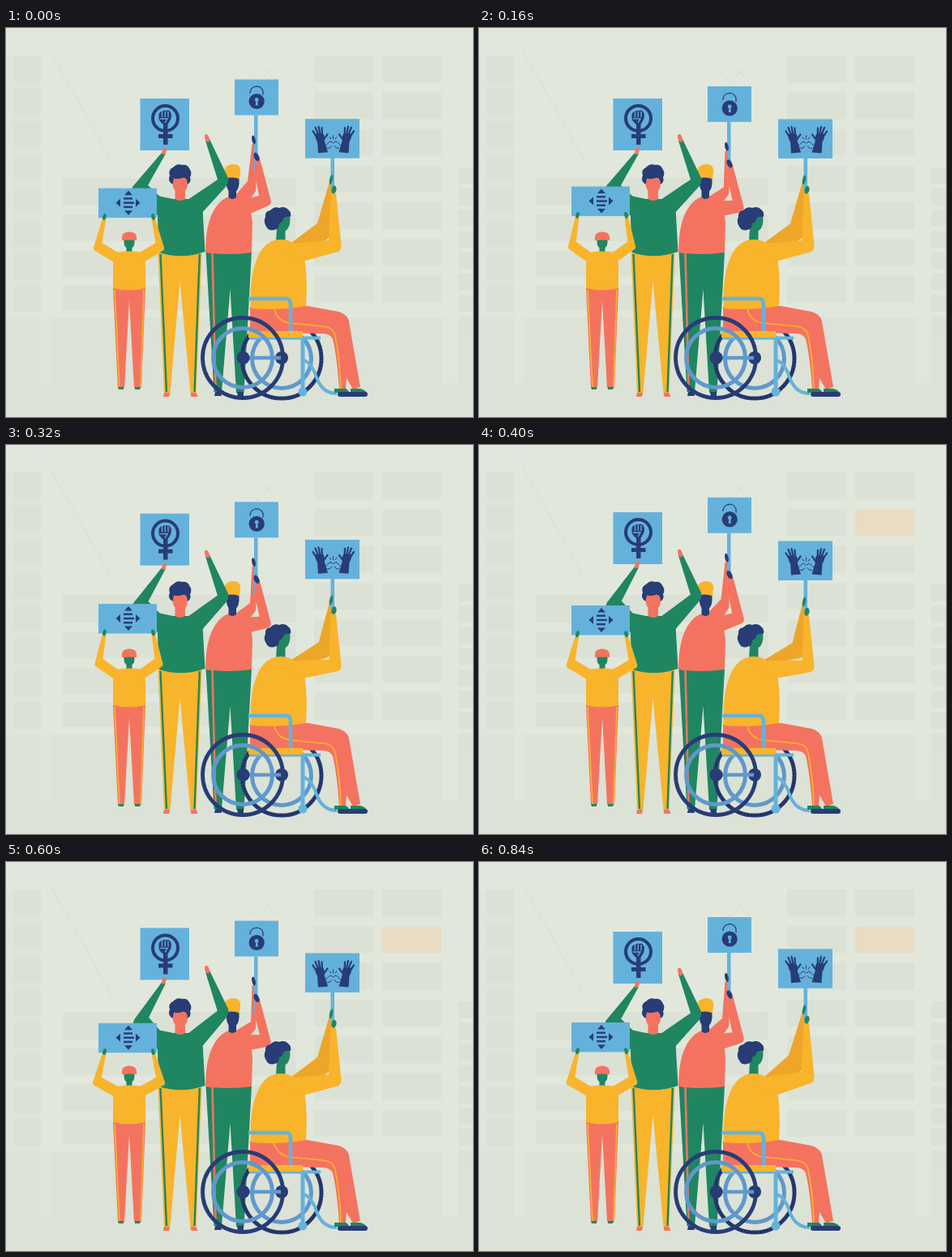
Animation, 576 px wide and 480 px high, one loop 0.88 s. Source, as an HTML page:

```html
<!DOCTYPE html>
<html>
<head>
<meta charset="utf-8">
<title>Raised signs</title>
<style>
html, body { margin: 0; width: 100%; height: 100%; overflow: hidden; background: #e1e7db; }
svg { display: block; width: 576px; height: 480px; }
</style>
</head>
<body>
<svg id="stage" viewBox="0 0 576 480" xmlns="http://www.w3.org/2000/svg"></svg>
<script>
const Y = '#f8b42b', DY = '#eda628', R = '#f47360', G = '#1f8661', N = '#283c75';
const B = '#64b2dc', MB = '#5f98cc', WIN = '#dbe1d5';
const LOOP = 880, STEP = 40;

const p = (d, fill, extra = '') => `<path d="${d}" fill="${fill}" ${extra}/>`;
const line = (d, color, w, extra = '') =>
  `<path d="${d}" fill="none" stroke="${color}" stroke-width="${w}" ${extra}/>`;
const box = (x, y, w, h, fill, extra = '') =>
  `<rect x="${x}" y="${y}" width="${w}" height="${h}" fill="${fill}" ${extra}/>`;
const dot = (x, y, r, fill, extra = '') => `<circle cx="${x}" cy="${y}" r="${r}" fill="${fill}" ${extra}/>`;
const ring = (x, y, r, color, w, extra = '') =>
  dot(x, y, r, 'none', `stroke="${color}" stroke-width="${w}" ${extra}`);
const group = (id, body) => `<g id="${id}">${body}</g>`;
const live = (id, fill) => `<path id="${id}" fill="${fill}"/>`;
const oval = (x, y, rx, ry, fill, turn = 0) =>
  `<ellipse cx="${x}" cy="${y}" rx="${rx}" ry="${ry}" fill="${fill}" transform="rotate(${turn} ${x} ${y})"/>`;

function column(x, w, y, pitch, h, n) {
  let s = '';
  for (let i = 0; i < n; i++) s += box(x, y + i * pitch, w, h, WIN);
  return s;
}

function backdrop() {
  return box(0, 0, 576, 480, '#e1e7db') +
    box(0, 357, 576, 123, '#dce2d6') +
    box(0, 34, 43, 323, '#dee4d8', 'opacity=".5"') +
    box(43, 357, 13, 81, '#e0e6da') + box(538, 357, 20, 81, '#e0e6da') +
    column(9, 34, 34.5, 40.4, 33, 8) +
    column(380, 73, 34, 45.3, 33, 7) +
    column(464, 73, 34, 45.3, 33, 7) +
    column(558, 18, 172, 26.2, 21, 8) +
    box(70, 185, 287, 34, WIN) + box(70, 230, 287, 33, WIN) +
    box(70, 275, 287, 32, WIN) + box(70, 318, 287, 30, WIN) +
    line('M53 27L97 104L131 167M545 27L576 59M294 52L318 76M311 43L333 66M333 45L308 69', '#d6ddd1', 1) +
    box(464, 80, 73, 31.5, '#e9dcc2', 'id="lamp"');
}

function child() {
  return p('M132 321H172L167 444H158L152 336L146 444H138Z', R) +
    line('M134 323L140 443M170 323L166 443', Y, 1.6) +
    p('M138 443h7v3h-6zM159 443h7l-1 3h-6z', G) +
    p('M148.500 266h7v11h-7z', G) +
    p('M137 277Q152 274 167 277L172 290V321Q152 326 132 321V290Z', Y) +
    live('childArm', Y) + '<use href="#childArm" transform="matrix(-1 0 0 1 303 0)"/>' +
    p('M145.500 259h13v5q0 8-6.500 8t-6.500-8z', G) +
    p('M143 262Q142 254 147 252.500Q152 250.500 157 252.500Q162 254 161 262Q152 261 143 262Z', R);
}

function woman() {
  return p('M187.500 278H241.500L234.500 450H227.500L214.500 312L202.500 450H195Z', Y) +
    line('M190.500 279L198 449M238.800 279L232.500 449', G, 2.4) +
    p('M195 450h7l-1 5h-7zM227.500 450h7l2 5h-8z', R) +
    live('armL', G) + live('armR', G) +
    p('M187 207L206 211H225L242 214L245.500 276Q217 286 188.500 277L187 235Z', G) +
    p('M208.500 197h12.500v14q-6 4-12.500 0z', R) +
    p('M205.500 184h18.500v8q0 11-9 11t-9.500-11z', R) +
    p('M203 191Q199.500 187 202 182Q199.500 175 206 172Q211 166.500 217 169Q224 168 226.500 174Q230 179 227 184Q229 190 224 193Q224 185 219 184.500Q213 187 207 185.500L205.500 193Z', N) +
    group('fistL', oval(195, 152, 2.4, 4.5, R, 20)) +
    group('fistR', oval(248, 136, 2.6, 5, R, -18));
}

function keyHolder() {
  return p('M246.500 276H303L293.500 450H284L276.500 322L266 449H256.500Z', G) +
    line('M254.500 278L258.500 445', R, 2.6) +
    p('M258 449h7l1 5h-9zM285 449h8v6h-7z', N) +
    live('keyFar', R) +
    p('M272 209Q286 206 300 212L304 240L303 277Q275 281 246 277Q246 223 272 209Z', R) +
    p('M274.500 198h9.500v11q-5 4-9.500 0z', N) +
    p('M272 183h15.500v9q-1 11-7.500 11q-7 0-8-9z', N) +
    p('M270 184Q267.500 177 271 171.500Q277 166.500 284 168.500Q290 170.500 289 178L288 186.500Q280 183 271 186Z', Y);
}

function rider() {
  return p('M301 344L372 343L410 350Q423 354 423.500 365L437 443L428 446L420 432L419 445H411Q408 404 403 384Q400 377 390 377L301 375Z', R) +
    line('M330 344Q334 362 350 364L390 368Q404 369 406 380Q412 410 413 445', Y, 1.6) +
    p('M334 247h10.500v16q-6 6-11.500 0z', G) +
    p('M331 262Q338 260 347 262Q365 268 369 289Q372 315 370 343Q340 349 302 346Q300 310 308 289Q315 267 331 262Z', Y) +
    live('riderNear', Y) +
    p('M336 228H349.500Q352 240 348 247Q343 254 334 250Z', G) +
    p('M321 245Q317 239 320 233Q319 226 326 225Q331 219.500 337 222Q344 219.500 348 224Q353 228 350.500 233Q345 232 342 235Q342 239 337 241Q337 248 331 249Q324 251 321 245Z', N);
}

function chairBack() {
  return ring(340, 408, 49, N, 5) + ring(340, 408, 49, '#1b2a50', 2, 'stroke-dasharray="2 2"') +
    ring(340, 408, 36.5, MB, 5) + dot(340, 407, 8, N);
}

function chairFront() {
  return line('M300 382.500H388', B, 4) +
    box(299, 374, 67, 8, Y) +
    line('M299 334H345Q351 334 351 341V374', B, 4.5) +
    line('M366 383V446', B, 5) + dot(366, 449, 5.5, B) +
    line('M368 410Q378 415 383 431Q390 451 408 451', B, 4) +
    p('M405 445h14q4 2 4 5h-18zM425 445h12q7 2 7 5h-19z', G) +
    box(409, 449, 37, 6, N, 'rx="3"') +
    line('M292 407H340', MB, 4.5) +
    ring(292, 407, 36.5, MB, 5) + ring(292, 407, 49.5, N, 4.8) + dot(292.5, 407, 8, N);
}

function fistSign() {
  return box(165.5, 0, 60.5, 64, B) +
    ring(196.5, 24.500, 15.500, N, 4) +
    p('M188.500 19Q190 15.500 193 16Q195 13.500 198 15Q201 13.500 203 17Q205 20 203 26L199.500 32V57H194V32Q188.500 28 188.500 24Z', N) +
    line('M192.500 16.500V23M196.300 15.500V23M200 16V23M190 25H199L196 30', B, 1.3) +
    box(188, 44, 17.500, 5, N);
}

function lockSign() {
  return box(282, 0, 54, 44, B) +
    line('M301 17V15.500A8.200 8.200 0 0 1 317 14.500V19', N, 1.3) +
    dot(309.2, 27, 9.6, N) + dot(309.2, 25, 2.4, B) + p('M308.400 26h1.800l.7 6h-3.200z', B);
}

function handsSign() {
  const hand = p('M381.500 18L391 18Q393.500 21 392.500 26L397 41L385 42L384 28Q381 24 381.500 18Z', N) +
    line('M383 22L378.500 15M385 19L381.500 10.500M387.500 19L385.500 9.500M390 20L389.500 11M391.500 26L396.500 19', N, 2.2, 'stroke-linecap="round"');
  return box(369, 0, 67, 48.500, B) +
    hand + `<g transform="matrix(-1 0 0 1 807.500 0)">${hand}</g>` +
    line('M394 33L399 28Q402 27 403 30M413 33L408 28Q405 27 404 30M396 36Q400 37 402 33M411 36Q407 37 405 33M403.500 20V25M399 22L401 25M408 22L406 25', N, 1);
}

function arrowsSign() {
  return box(114, 0, 72, 36.500, B) +
    p('M151 3L156 8.500H146ZM151 33L156 27.500H146ZM135.500 18L141 13V23ZM165.500 18L160 13V23Z', N) +
    box(145, 11.5, 11, 2.4, N) + box(145, 16.8, 13, 2.4, N) + box(145, 22, 11, 2.4, N);
}

const stage = document.getElementById('stage');
stage.innerHTML = backdrop() + keyHolder() +
  group('lock', box(306, 44, 4.5, 70, B) + lockSign()) +
  live('keyNear', R) +
  group('keyHands', oval(305.5, 138, 2.2, 5.5, N, -12) + oval(309, 159, 3, 5.5, N, -25)) +
  group('fist', fistSign()) + woman() +
  child() + group('arrows', arrowsSign()) +
  group('childHands', oval(121.5, 233, 2.2, 4, G, 15) + oval(181.5, 233, 2.2, 4, G, -15)) +
  chairBack() +
  live('riderFar', DY) +
  group('hands', box(400.5, 48, 4.5, 38, B) + handsSign()) +
  rider() +
  group('riderHands', oval(401, 187, 2, 6, G, 12) + oval(404.5, 199.5, 3, 5, G, 10)) +
  chairFront();

const el = id => document.getElementById(id);
const move = (id, y) => el(id).setAttribute('transform', `translate(0 ${y.toFixed(2)})`);
const shape = (id, d) => el(id).setAttribute('d', d);

// Height of each sign over one loop, as [time, top] pairs
const tops = {
  fist: [[0, 87], [80, 87.5], [240, 86], [400, 83], [520, 80.5], [680, 83], [840, 86]],
  lock: [[0, 63.5], [80, 67.5], [240, 74.2], [400, 64.7], [440, 64.5], [520, 69.3], [680, 74], [840, 68]],
  hands: [[0, 112.2], [80, 111.2], [240, 114.3], [400, 118.5], [520, 114.2], [680, 110.9], [840, 107.3]],
  arrows: [[0, 197.7], [80, 197.3], [240, 194.5], [400, 198], [520, 197.7], [680, 199.7], [840, 198]]
};

// Smooth curve through the pairs
function at(keys, t) {
  const last = keys.length - 1;
  let i = 0;
  while (i < last - 1 && t >= keys[i + 1][0]) i++;
  const slope = k => {
    const a = keys[Math.max(k - 1, 0)], b = keys[Math.min(k + 1, last)];
    return (b[1] - a[1]) / (b[0] - a[0]);
  };
  const [t0, y0] = keys[i], [t1, y1] = keys[i + 1];
  const h = t1 - t0, u = (t - t0) / h, v = 1 - u;
  return v * v * (1 + 2 * u) * y0 + u * u * (3 - 2 * u) * y1 +
    h * u * v * (v * slope(i) - u * slope(i + 1));
}

function draw(t) {
  const d = {};
  for (const id in tops) {
    const y = at(tops[id], t);
    d[id] = y - tops[id][0][1];
    move(id, y);
  }
  el('lamp').style.display = t >= 360 ? '' : 'none';

  const c = d.arrows;
  move('childHands', c);
  shape('childArm', `M119 ${235 + c}H123.500L${118.5 - c * .6} ${265 + c * .7}L138 277V292L${110 - c * .9} ${275 + c * .7}Q${107.5 - c * .9} ${274 + c * .7} ${108 - c * .9} ${271 + c * .7}Z`);

  const f = d.fist, r = f * .6;
  move('fistL', f);
  move('fistR', r);
  shape('armL', `M192 ${154 + f}L197 ${155 + f}L${175 - f * .2} ${194 + f * .4}L190 208V234L158 ${205 + f * .3}Q${154 - f * .3} ${202 + f * .3} ${156 - f * .4} ${196 + f * .3}Z`);
  shape('armR', `M246 ${139 + r}L251 ${137 + r}L${273.5 - f * .05} ${184 + r}Q276 ${190 + r} 271 ${196 + r}L240 230L224 212L${261 + f * .05} ${187 + r}Z`);

  const k = d.lock;
  move('keyHands', k);
  shape('keyFar', `M303.500 ${143 + k}H307.500L310 ${165 + k}L308 ${201 + k * .5}L292 226L279 211L${298 + k * .45} ${189 + k * .9}Z`);
  shape('keyNear', `M307 ${163 + k}L312.500 ${159 + k}L326.500 ${212 + k}Q328 ${218 + k * .9} 322 ${220 + k * .9}L297 ${231 + k * .2}L288 213L${312 + k * .1} ${207 + k * .7}L307 ${180 + k}Z`);

  const h = d.hands;
  move('riderHands', h);
  shape('riderFar', `M398.500 ${191 + h}L403 ${192 + h}L401 ${252 + h * .7}Q400 ${260 + h * .6} 390 264L352 272V265L${384 + h * .4} ${241 + h * .5}Z`);
  shape('riderNear', `M400.500 ${204 + h}H407L413.500 ${268 + h * .7}Q414 ${276 + h * .6} 406 ${277 + h * .6}L366 288L340 276L352 266L${398 + h * .1} ${262 + h * .6}Z`);
}

function tick(now) {
  draw(Math.floor(now % LOOP / STEP) * STEP);
  requestAnimationFrame(tick);
}
draw(0);
requestAnimationFrame(tick);
</script>
</body>
</html>
```
